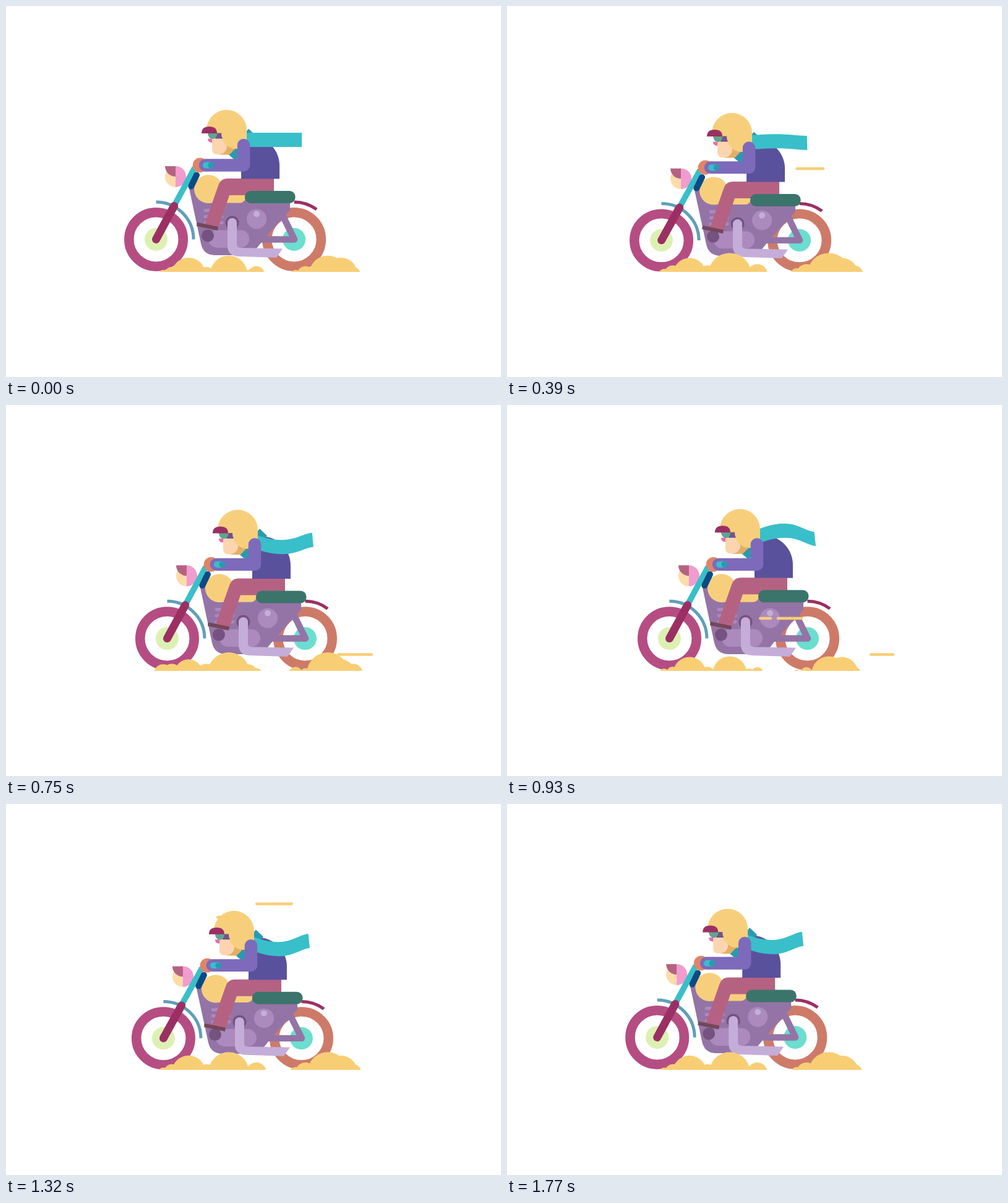
Write an HTML page with a canvas that moves like this. It is 800x600 px and loops after 1800 ms.

```html
<!DOCTYPE html>
<html lang="en">
<head>
<meta charset="utf-8">
<title>Motorcycle ride</title>
<style>
html, body { margin: 0; width: 100%; height: 100%; overflow: hidden; background: #fff; }
canvas { display: block; width: 800px; height: 600px; }
</style>
</head>
<body>
<canvas id="stage" width="800" height="600"></canvas>
<script>
const ctx = document.getElementById('stage').getContext('2d');
const LOOP = 1800, BEAT = 900, PUFF = 450, STEP = 30;
const GROUND = 430, TAU = Math.PI * 2;

const C = {
  yellow: '#f7cf7c', dust: '#f8ce75', teal: '#39bfc9', deepTeal: '#2a9ab0',
  wine: '#9b2f63', rose: '#b56282', frame: '#9474a6', light: '#ac8abd',
  pale: '#c5add9', plum: '#75527f', sleeve: '#7d6abb', coat: '#5a519c'
};

// Dust puffs pulse: mean height, swing, phase of the peak, pulses per cycle
const puffs = [
  { xs: [360, 520], mid: 25, amp: 6.5, peak: 0.78, rate: 1 },
  { xs: [295, 541], mid: 19.7, amp: 3.5, peak: 0.96, rate: 1 },
  { xs: [404.5, 484], mid: 8.5, amp: 4.2, peak: 0.78, rate: 2 },
  { xs: [268, 324, 561], mid: 8.5, amp: 3.2, peak: 0.72, rate: 1 },
  { xs: [254, 391], mid: 8.3, amp: 5, peak: 0.5, rate: 1 },
  { xs: [468], mid: 3.3, amp: 3.7, peak: 0.75, rate: 1 }
];

// Speed lines: the tip runs evenly, the tail follows late
const streaks = [
  { y: 161.5, x: 480, run: 163, from: 60, time: 300 },
  { y: 263, x: 468, run: 172, from: 310, time: 320 },
  { y: 403.5, x: 525, run: 115, from: 390, time: 627 },
  { y: 345, x: 409, run: 68, from: 855, time: 300 },
  { y: 345, x: 437, run: 130, from: 840, time: 300 },
  { y: 183, x: 339, run: 96, from: 1110, time: 500 },
  { y: 161.5, x: 400, run: 140, from: 1210, time: 250 }
];

const smooth = f => f * f * (3 - 2 * f);
const bump = (p, skew) => Math.sin(Math.PI * p ** skew) ** 2;

function disc(x, y, r, color) {
  ctx.fillStyle = color;
  ctx.beginPath();
  ctx.arc(x, y, r, 0, TAU);
  ctx.fill();
}

function arc(x, y, r, a, b, color, width) {
  ctx.strokeStyle = color;
  ctx.lineWidth = width;
  ctx.lineCap = 'butt';
  ctx.beginPath();
  ctx.arc(x, y, r, a, b);
  ctx.stroke();
}

function shape(d, color) {
  ctx.fillStyle = color;
  ctx.fill(new Path2D(d));
}

function line(d, color, width, cap = 'round') {
  ctx.strokeStyle = color;
  ctx.lineWidth = width;
  ctx.lineCap = cap;
  ctx.lineJoin = 'round';
  ctx.stroke(new Path2D(d));
}

function pill(x, y, w, h, r, color) {
  ctx.fillStyle = color;
  ctx.beginPath();
  ctx.roundRect(x, y, w, h, r);
  ctx.fill();
}

function wheel(x, rim, hub) {
  arc(x, 378, 43.75, 0, TAU, rim, 15.5);
  disc(x, 378, 18.5, hub);
}

function drawFrame() {
  arc(465.5, 378, 60.5, -TAU / 4, -0.925, C.wine, 5);
  wheel(465.5, '#ce7a69', '#6bdecf');
  wheel(242.5, '#b54d82', '#ddf0b3');
  arc(242.5, 378, 60.5, -TAU / 4, 0, '#609fb9', 5);

  line('M445 335L466 378H408', C.frame, 10.5);
  shape('M295 291H305L320 312H459V331L444 347L415 380L396 403.500H337Q319 403 315 385Z', C.frame);
  for (const y of [331, 341, 351]) line(`M322 ${y}H349`, C.light, 5);
  pill(327, 363, 66, 28.5, 14, C.light);
  disc(326, 372, 10, C.plum);
  disc(405, 345, 16, C.light);
  disc(405, 337, 5, C.pale);
  arc(365.5, 351, 8.7, 0, TAU, C.plum, 4.5);
  shape('M358 351A7.4 7.4 0 0 1 373 351V386Q373 391.5 379 391.7L447 393L437 407.5L376 405.5Q358 405 358 388Z', C.pale);

  disc(327, 296.5, 23, C.yellow);
  pill(327, 290, 60, 29, [0, 0, 9, 0], C.yellow);
}

function drawFork() {
  disc(274, 276.5, 17, '#fddcaa');
  shape('M274 259.5A17 17 0 0 1 274 293.5Z', '#f09ccf');
  shape('M257 259.5H274V276.5A17 17 0 0 1 257 259.5Z', C.rose);
  line('M305 262L272 323', C.teal, 9.5, 'butt');
  line('M308 274L299.3 292', '#0b4a85', 10);
  line('M271.7 324L242.5 378', C.wine, 13);
}

function drawScarf(d) {
  const k = Math.abs(d) / 13;
  const top = 205, low = 228, a = 478 - 1.4 * k, b = 478 + k;
  ctx.fillStyle = C.teal;
  ctx.beginPath();
  ctx.moveTo(376, top);
  ctx.bezierCurveTo(392, top + d / 2, 408, top + d, 428, top + d);
  ctx.bezierCurveTo(450, top + d, 462, top + d * 0.15, a, top);
  ctx.lineTo(b, low);
  ctx.bezierCurveTo(464, low + d * 0.15, 452, low + d, 430, low + d);
  ctx.bezierCurveTo(408, low + d, 392, low + d / 2, 376, low);
  ctx.fill();
}

function drawRider(d) {
  shape('M433 279H357Q347 279.500 343.500 289L321 353L343 358.500L361 306H433Z', C.rose);
  shape('M309 350L343 357L342 363L308 356Z', '#73475a');
  shape('M380 279.5V211H395A47 47 0 0 1 442 258V279.5Z', C.coat);
  shape('M392 198.5L404 210L371 250L358 239Z', C.deepTeal);
  drawScarf(d);
  pill(386, 299, 81.5, 20, 9.5, '#3b746b');

  shape('M345 240.500H361L373 228L352 215Z', '#e5ae63');
  shape('M333 213H357V227A13 13 0 0 1 344 240H341Q333 240 333 231Z', '#fcd5b0');
  shape('M324 206V200.500A32.500 32.500 0 0 1 389 200.500V231H372A24 24 0 0 1 348 207V206Z', C.yellow);
  shape('M338 205.500H348Q348 211 350 214.500H338Z', '#74528a');
  shape('M326 205.500H341.500A7.750 9.500 0 0 1 326 205.500Z', '#5fa58f');
  shape('M326 214.500H333V221Q326 221 326 214.500Z', '#e86aaa');
  shape('M316 206Q316 195 328.500 195Q341 195 341 206Z', C.wine);
}

function drawArm() {
  disc(313.5, 258, 11.8, '#e08468');
  line('M384 225.5V258H322', C.sleeve, 20.5);
  pill(318, 253.2, 18, 10, 5, C.teal);
  disc(331.5, 258.2, 5, C.deepTeal);
}

function drawDust(t) {
  const sink = 4;
  for (const { xs, mid, amp, peak, rate } of puffs) {
    const h = mid + amp * Math.cos(TAU * (rate * t / PUFF - peak));
    if (h > 0) for (const x of xs) disc(x, GROUND + sink, h + sink, C.dust);
  }
}

function drawStreaks(t) {
  for (const { y, x, run, from, time } of streaks) {
    const f = (t - from) / time;
    if (f > 0 && f < 1) line(`M${x + run * f ** 4} ${y}H${x + run * f}`, C.dust, 4.5);
  }
}

function draw(t) {
  const p = t % BEAT / BEAT;
  const u = (t - 28 + LOOP) % LOOP / BEAT;
  const x = 20 * smooth(u < 1 ? u : 2 - u);
  const dip = bump(p, 0.65);
  const drop = 5 * bump(p, 0.75) + 1.8 * p ** 5;
  const wave = -13.5 * Math.sin(TAU * 16 * t / LOOP);

  // The machine squashes towards the ground while the rider shifts whole
  const machine = paint => {
    ctx.save();
    ctx.translate(x, GROUND - 0.6 * (1 - dip));
    ctx.scale(1, 1 - dip * 0.02);
    ctx.translate(0, -GROUND);
    paint();
    ctx.restore();
  };

  ctx.clearRect(0, 0, 800, 600);
  ctx.save();
  ctx.beginPath();
  ctx.rect(0, 0, 800, GROUND);
  ctx.clip();
  machine(() => { drawFrame(); drawFork(); });
  ctx.save();
  ctx.translate(x, drop);
  drawRider(wave);
  ctx.restore();
  machine(drawArm);
  drawDust(t);
  ctx.restore();
  drawStreaks(t);
}

const start = performance.now();
function tick() {
  const t = (performance.now() - start) % LOOP;
  draw(Math.floor(t / STEP) * STEP);
  requestAnimationFrame(tick);
}
tick();
</script>
</body>
</html>
```
